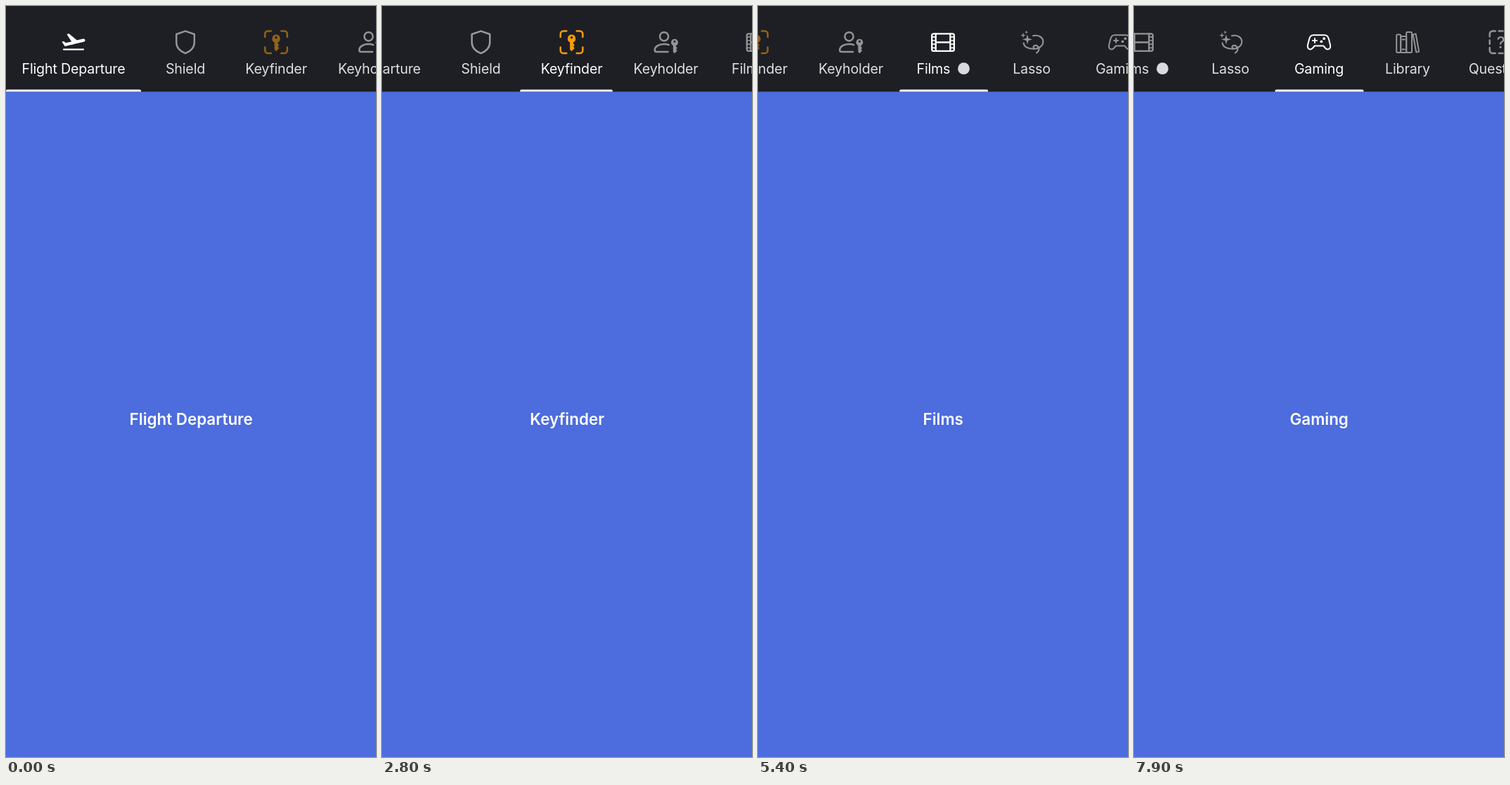
An HTML page that plays this animation: 526 px wide and 1065 px high, repeating every 8000 ms.

```html
<!DOCTYPE html>
<html lang="en">
<head>
<meta charset="utf-8">
<title>Scrolling tab bar</title>
<style>
  html, body { margin: 0; width: 100%; height: 100%; overflow: hidden; background: #4d6cdd; }
  svg { display: block; width: 526px; height: 1065px; }
  text { font-family: Inter, Roboto, sans-serif; fill: #fff; }
  .label { font-size: 19.6px; letter-spacing: -.008em; }
  .title { font-size: 22.4px; font-weight: 600; }
  .icon { color: #fff; fill: none; stroke: currentColor; stroke-width: 2.5; stroke-linecap: round; stroke-linejoin: round; }
  .solid { fill: currentColor; stroke: none; }
  .mark { fill: currentColor; stroke: none; font-size: 23px; font-weight: 500; }
</style>
</head>
<body>
<svg viewBox="0 0 526 1065">
  <rect width="526" height="1065" fill="#4d6cdd"/>
  <rect width="526" height="121.5" fill="#1e1f24"/>
  <g id="strip">
    <g id="tabs"></g>
    <path id="bar" fill="#fff"/>
  </g>
  <text id="title" class="title" x="263.2" y="593.8" text-anchor="middle"></text>
</svg>
<script>
const LOOP = 8000, VIEW = 526;

const path = (d, attrs = '') => `<path d="${d}" ${attrs}/>`;
const solid = (d, attrs = '') => path(d, `class="solid" fill-rule="evenodd" ${attrs}`);
const rect = (x, y, w, h, r) => `<rect x="${x}" y="${y}" width="${w}" height="${h}" rx="${r}"/>`;
const dot = (x, y, r) => `<circle class="solid" cx="${x}" cy="${y}" r="${r}"/>`;
const star = (x, y, r) => {
  const k = r * .22;
  return solid(`M${x} ${y - r}l${k} ${r - k} ${r - k} ${k} ${k - r} ${k} ${-k} ${r - k} ${-k} ${k - r} ${k - r} ${-k} ${r - k} ${-k}z`);
};
const key = (x, y, s) => solid(
  'M0-5.8a5.8 5.8 0 0 1 2.4 11v1.8l2 2-2 2.2 2 2.2-4.4 4.4-2.4-2.4v-10.2a5.8 5.8 0 0 1 2.4-11zM0-3.4a1.8 1.8 0 0 0 0 3.6 1.8 1.8 0 0 0 0-3.6z',
  `transform="translate(${x} ${y}) scale(${s})"`);
const corners = arm => [[1, 1], [-1, 1], [1, -1], [-1, -1]].map(([sx, sy]) =>
  path(`M-15.8 ${-15.8 + arm}v${4.2 - arm}a4.2 4.2 0 0 1 4.2-4.2h${arm - 4.2}`,
    `transform="translate(0 51.3) scale(${sx} ${sy})"`)).join('');
const holes = [43.8, 49, 54.2, 59.4].map(y => `M-16 ${y}h5.5M16 ${y}h-5.5`).join('');

const icons = {
  flight: solid('M22.07 9.64c-.21-.8-1.04-1.28-1.84-1.06L14.92 10 8.02 3.57l-1.93.51 4.14 7.17-4.97 1.33-1.97-1.54-1.45.39 2.59 4.49s7.12-1.9 16.57-4.43c.81-.23 1.28-1.05 1.07-1.85z',
    'transform="translate(-19.5 34.1) scale(1.63 1.45)"') + path('M-14 61.6h28', 'stroke-width="2.2"'),
  shield: path('M0 35.6L12.8 40V51.5C12.8 59.5 7 64.3 0 67.2C-7 64.3-12.8 59.5-12.8 51.5V40Z'),
  finder: corners(8.6) + key(0, 46.4, 1),
  holder: '<circle cx="-2.5" cy="43.3" r="6.1"/>' +
    path('M3 65H-13c-2 0-2.8-1-2.8-2.6C-15.8 57.5-10 54-2.5 54c2.7 0 4.9.4 6.6 1.2') + key(12.4, 51.7, .87),
  films: `<g stroke-width="2.3">${rect(-15.8, 39.3, 31.6, 24.6, 2.4)}${path('M-10.3 39.5v24M10.3 39.5v24M-10.3 51.5h20.6')}${path(holes, 'stroke-width="1.7"')}</g>`,
  lasso: `<g stroke-width="2.1">${path('M2 42.3C9 40.4 16.3 44 16.3 50.4C16.3 57 10 60.8 2.5 60.8C-5 60.8-11 57.5-11.3 52.6')}${path('M3.5 60.5c-3-3.5 1.5-6 5-3.4c3.6 2.8 1.6 7.6-1.5 9.4')}</g>` +
    star(-6, 47.4, 7) + star(-12, 41.6, 4) + star(-7.4, 37.2, 2.8),
  gaming: path('M-8 41.2H8c3 0 5 1.8 6 6l2 8c.8 4-1.2 6.3-3.6 6.3c-3 0-4-2.2-6-5H-6.4c-2 2.8-3 5-6 5c-2.4 0-4.4-2.3-3.6-6.3l2-8c1-4.2 3-6 6-6z', 'stroke-width="2"') +
    path('M-9 49h6M-6 46v6', 'stroke-width="2"') + dot(7.2, 46.2, 1.9) + dot(3.4, 50.4, 1.9),
  library: `<g stroke-width="2">${rect(-15.8, 40.6, 6, 25.4, 1.5)}${rect(-9.8, 43, 8, 23, 1)}${rect(-1.8, 37, 7.8, 29, 1.5)}${path('M7.6 40.4l4-1 4.6 25.2-4 1zM-7.4 47.4h3.2M-7.4 61.4h3.2')}</g>`,
  question: corners(8) + path('M-2.8 35.5h5.6M-2.8 67.1h5.6M-15.8 48.5v5.6M15.8 48.5v5.6') +
    '<text class="mark" x="0" y="59.5" text-anchor="middle">?</text>',
};

// name, icon, tab width
const tabs = [
  ['Flight Departure', 'flight', 192],
  ['Shield', 'shield', 126],
  ['Keyfinder', 'finder', 132],
  ['Keyholder', 'holder', 136],
  ['Films', 'films', 126],
  ['Lasso', 'lasso', 126],
  ['Gaming', 'gaming', 126],
  ['Library', 'library', 126],
  ['Questions', 'question', 139],
].map(([name, icon, w]) => ({ name, icon, w }));

// touch down, release, tab index
const taps = [
  [1430, 1586, 1],
  [2350, 2500, 2],
  [3480, 3630, 3],
  [4700, 4850, 4],
  [5800, 5950, 5],
  [7100, 7250, 6],
];

const $ = id => document.getElementById(id);
let edge = 0;
for (const tab of tabs) {
  tab.x = edge;
  edge += tab.w;
  tab.mid = tab.x + tab.w / 2;
  tab.scroll = Math.max(0, tab.mid - VIEW / 2);
}

$('tabs').innerHTML = tabs.map(({ name, icon, mid }) => {
  const badge = icon === 'films';
  return `<g transform="translate(${mid} 0)">
    <g class="icon"${icon === 'finder' ? ' style="color:#ff9f0a"' : ''}>${icons[icon]}</g>
    <text class="label" x="${badge ? -13.6 : 0}" y="95.6" text-anchor="middle">${name}</text>
    ${badge ? '<circle cx="29.5" cy="88.7" r="8.4" fill="#dad9dd"/>' : ''}
  </g>`;
}).join('');
tabs.forEach((tab, i) => {
  tab.node = $('tabs').children[i];
  [tab.art, tab.label] = tab.node.children;
});

const clamp = v => Math.min(1, Math.max(0, v));
const mix = (a, b, p) => a + (b - a) * p;

function spring(ms, response = .55, damping = .825) {
  if (ms <= 0) return 0;
  const t = ms / 1000, w = 2 * Math.PI / response;
  const root = Math.sqrt(1 - damping * damping), a = w * root * t;
  return 1 - Math.exp(-damping * w * t) * (Math.cos(a) + damping / root * Math.sin(a));
}

function draw(t) {
  let x = 0, w = tabs[0].w, scroll = 0, glow = 1, current = tabs[0];
  const picked = tabs.map((_, i) => i ? 0 : 1);
  const press = tabs.map(() => 0);

  for (const [down, up, i] of taps) {
    if (t < down) break;
    press[i] = clamp((t - down) / 80) * (1 - clamp((t - up) / 300));
    if (t < up) break;
    const tab = current = tabs[i], p = spring(t - up);
    x = mix(x, tab.x, p);
    w = mix(w, tab.w, p);
    scroll = mix(scroll, tab.scroll, Math.min(1, spring(t - up + 4)));
    glow = 1 - .25 * Math.sin(Math.PI * clamp(p));
    picked.forEach((v, k) => picked[k] = mix(v, k === i ? 1 : 0, clamp(p)));
  }

  $('strip').setAttribute('transform', `translate(${-scroll} 0)`);
  $('bar').setAttribute('d', `M${x} 121.5v-1q0-2 2-2h${w - 4}q2 0 2 2v1z`);
  $('bar').setAttribute('opacity', glow);
  if ($('title').textContent !== current.name) $('title').textContent = current.name;
  tabs.forEach((tab, i) => {
    tab.node.setAttribute('opacity', 1 - .27 * press[i]);
    tab.art.setAttribute('opacity', mix(.52, 1, picked[i]));
    tab.label.setAttribute('opacity', mix(.86, 1, picked[i]));
  });
}

const begin = performance.now();
function tick() {
  draw((performance.now() - begin) % LOOP);
  requestAnimationFrame(tick);
}
tick();
</script>
</body>
</html>
```
